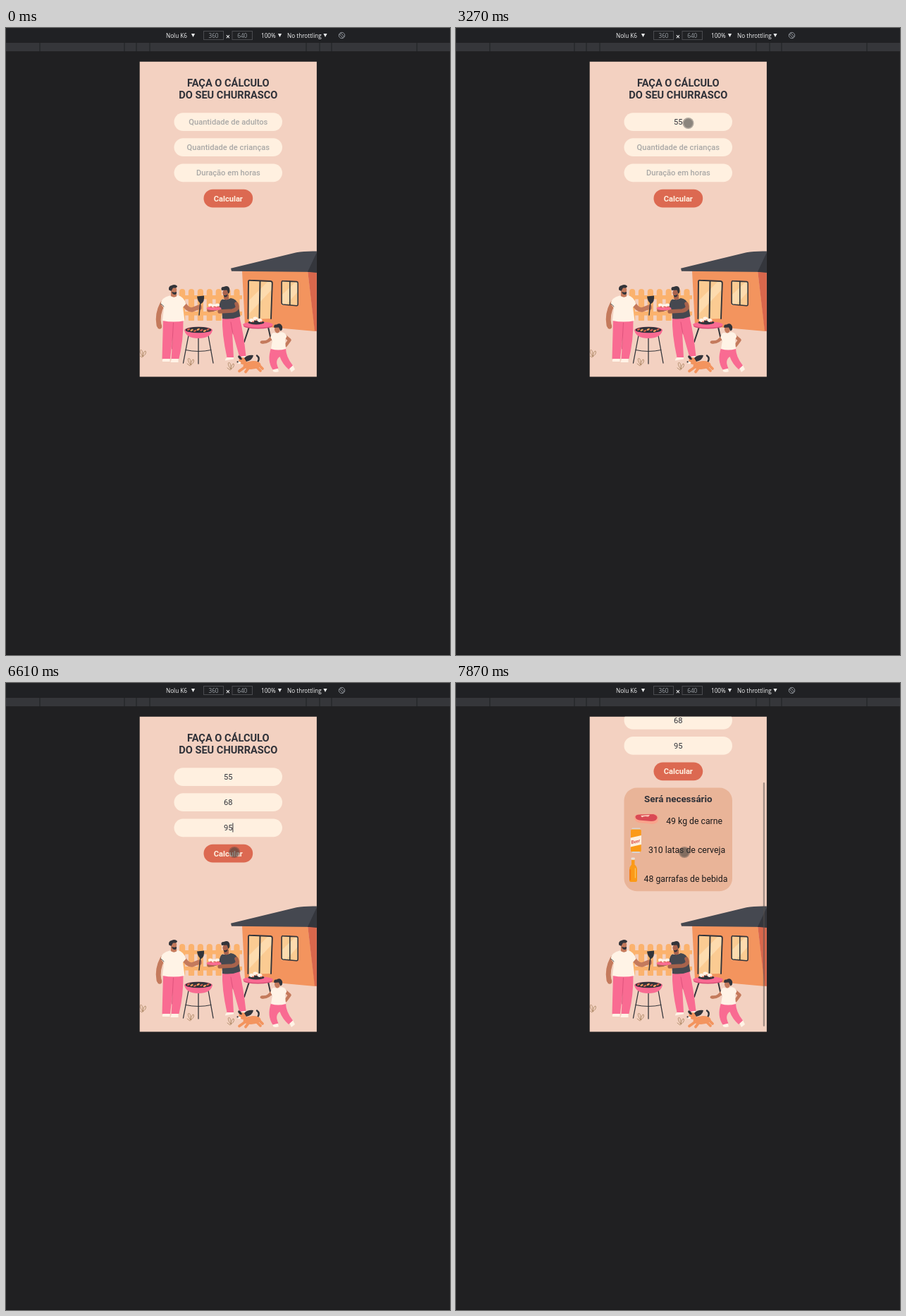
An HTML page with a canvas for the animation above (8 s loop, 630x889 px).

```html
<!DOCTYPE html>
<html lang="pt-BR">
<head>
<meta charset="utf-8">
<title>Cálculo do churrasco</title>
<style>
html, body { margin: 0; width: 100%; height: 100%; overflow: hidden; background: #202124; }
canvas { display: block; width: 630px; height: 889px; }
</style>
</head>
<body>
<canvas id="stage" width="630" height="889"></canvas>
<script>
const ctx = document.getElementById('stage').getContext('2d');
const LOOP = 8000;
const PAGE = { x: 189.7, y: 47.8, w: 251.2, h: 446.7 };
const RESULT_HEIGHT = 116.4;
const RESULT_AT = 6940;
const INK = '#2f3138', CREAM = '#fff0e0', DARK = '#32343a', SLATE = '#454850';
const PINK = '#f96b92', ROSE = '#d94c76', ORANGE = '#f3945e', SKIN = '#c47a5c', TAN = '#a8634c';
const WHITE = '#fff3e6';

// Drawing helpers
function fill(color, path) {
  ctx.fillStyle = color;
  ctx.fill(new Path2D(path));
}
function line(color, width, path) {
  ctx.strokeStyle = color;
  ctx.lineWidth = width;
  ctx.stroke(new Path2D(path));
}
function rect(color, x, y, w, h, r = 0) {
  ctx.fillStyle = color;
  ctx.beginPath();
  ctx.roundRect(x, y, w, h, r);
  ctx.fill();
}
function oval(color, x, y, rx, ry = rx, turn = 0) {
  ctx.fillStyle = color;
  ctx.beginPath();
  ctx.ellipse(x, y, rx, ry, turn, 0, Math.PI * 2);
  ctx.fill();
}
function text(str, x, y, font, color, align = 'left') {
  ctx.font = font;
  ctx.fillStyle = color;
  ctx.textAlign = align;
  ctx.fillText(str, x, y);
}
const roboto = (size, weight = 400) => `${weight} ${size}px Roboto, sans-serif`;
const mix = (a, b, p) => a + (b - a) * p;

function drawToolbar() {
  rect('#202022', 0, 0, 630, 889);
  rect('#202124', 0, 0, 630, 20);
  rect('#35363a', 0, 21, 630, 12);
  for (const x of [48, 168, 185, 204, 426, 445, 462, 583]) rect('#1f2023', x - 0.5, 21, 1, 12);
  rect('#19191b', 0, 888, 630, 1);

  const font = '500 8.2px "Open Sans", sans-serif';
  const boxFont = '8.2px "Open Sans", sans-serif';
  text('Nolu K6', 227, 14, font, '#f4f5f6');
  text('100%', 362, 14, font, '#f4f5f6');
  text('No throttling', 399, 14, font, '#f4f5f6');
  text('×', 315, 16, '600 11px "Open Sans", sans-serif', '#f4f5f6', 'center');
  for (const x of [265.5, 388.5, 453]) fill('#eceef0', `M${x - 2.6} 8h5.2l-2.6 5z`);
  for (const [x, w, label] of [[280, 29, '360'], [320.5, 29.5, '640']]) {
    ctx.strokeStyle = '#4a4b4f';
    ctx.lineWidth = 1;
    ctx.strokeRect(x + 0.5, 4.5, w - 1, 12);
    text(label, x + w / 2, 14, boxFont, '#9aa0a6', 'center');
  }
  line('#9aa0a6', 0.9, 'M480.7 10.5a4.2 4.2 0 1 1-8.4 0a4.2 4.2 0 1 1 8.4 0M473.5 9.2l2-1.7 4 4.3-2 1.8z');
}

function drawHouse() {
  fill(ORANGE, 'M335 344H428L438.5 430L339 421Z');
  fill('#d9674c', 'M428 344H441V430L438 429.6Z');
  fill(SLATE, 'M319 340.7L412 318.3Q424 316 441 316.5V346L320 344.8Z');
  fill('#34363c', 'M441 318L428 345.8L441 347Z');

  fill('#fbcb92', 'M344 358L377.5 360L376 412L343.5 413Z');
  fill('#fddbae', 'M345 386L371 360H377V371L345 405Z');
  line(DARK, 1.9, 'M343.5 412L344 359.5Q344 357.5 346.5 357.7L375.5 359Q378 359.3 377.8 362L376 412');
  line(DARK, 2, 'M360.5 359L359.5 411');
  fill('#fbcb92', 'M391 359H414V393H391Z');
  fill('#fddbae', 'M392 378L411 360H414V374L398 392H392Z');
  line(DARK, 1.6, 'M392.5 358.6L412.5 359.6Q414.3 360 414.2 362V392Q414 394 412 393.8L393 392Q391.2 391.7 391.1 390V361Q391 359 392.5 358.6M402.8 359V393');
}

function drawFence() {
  for (let i = 0; i < 7; i++) rect('#fbb26d', 246 + i * 12.9, 370, 8.2, 45, [4, 4, 1, 1]);
  rect('#fbb26d', 246, 379, 89, 5.5);
  rect('#fbb26d', 246, 402, 89, 5.5);
}

function drawTable() {
  line(DARK, 2, 'M345 424L338 445M372 424L376 442');
  oval(ROSE, 357.5, 422.4, 20.5, 4);
  oval(PINK, 357.5, 420.6, 21.3, 4.4);
  oval(DARK, 355, 417.5, 11.5, 3);
  for (const [x, y] of [[348.5, 414.5], [354, 412], [360, 414.5]]) {
    oval(WHITE, x, y, 3.6, 2.5, 0.2);
    oval('#ee806a', x + 2, y + 1.8, 1.8, 0.9);
  }
}

function drawGrill() {
  line(DARK, 1.3, 'M259 436L251.5 475M273 438V476M287 436L294 475');
  line(DARK, 1, 'M255 456.5Q273 460.5 291 456.5');
  fill(PINK, 'M253 428H293Q291 440 273 440Q255 440 253 428Z');
  oval(PINK, 273, 428.5, 20, 4.8);
  oval(DARK, 273, 428, 18.5, 4.3);
  for (let i = 0; i < 7; i++) {
    oval(i % 2 ? '#f6a05f' : '#c95f4c', 259 + i * 4.6, 427.4 + (i % 3), 2.3, 1.2, -0.5);
  }
}

function drawCook() {
  // Arms and legs
  line(SKIN, 7, 'M222 391Q214 406 217 421');
  oval(SKIN, 218, 423, 3.2, 3.8);
  fill(PINK, 'M223 413H251.5Q252 442 245.5 469H234.5L237 434L233 469H221.5Z');
  line(ROSE, 0.8, 'M237.5 418L235.5 455');
  fill(WHITE, 'M223 469H232.5V473H222Q221 471 223 469M235 469H244.5V474H233.5Z');
  line(SKIN, 6.4, 'M251 389Q257 400 264 399.5L273 396');
  oval(SKIN, 275, 396, 3, 3.8);
  // Shirt and head
  fill(WHITE, 'M232 379.5Q239 383 244 379Q252 381 255.5 391L251 396L253.5 415Q238 418 222 415L224 397L219.5 391Q221 382 232 379.5Z');
  line(DARK, 0.8, 'M219.5 391Q222 392 224 395');
  fill(SKIN, 'M234 374H242V380.5Q238 383 234 380Z');
  oval(SKIN, 238, 371.5, 4.2, 5.5);
  fill(DARK, 'M231.2 371.5Q230 366 235 365Q240 362.5 243 366Q243 369 237 368.5L234.5 373Z');
  fill(DARK, 'M235 374Q239 375.5 242 374Q242.5 378.5 239 378Q236 377.5 235 374Z');
  // Spatula
  line(DARK, 1.5, 'M276 388L274 407');
  fill(DARK, 'M271 380.5L281 379.5Q282 388 277 391Q272 389 271 380.5Z');
}

function drawHost() {
  fill(PINK, 'M307 410L331 408Q337 432 340.5 465L331.5 467L321 430L323 467H313.5Q306 433 307 410Z');
  line(ROSE, 0.8, 'M319 417L322 434');
  fill(WHITE, 'M314 467H323V469.5L311 471.5Q311 468 314 467M332 466L340 465L341 469L331 471Z');
  line(TAN, 5.4, 'M306 392Q300 400 288 400');
  fill(SLATE, 'M307 384.5Q314 386 319 383Q327 384 329.5 392L332.5 409Q320 414 307 412L306.5 400L302.5 395Q303 387 307 384.5Z');
  fill(TAN, 'M309 378H316V384Q312 387 309 383.5Z');
  oval(TAN, 311.5, 375.5, 4, 5.2);
  fill(DARK, 'M306 372Q304 367 309 367Q315 364 317 369Q318.5 374 315.5 377L313.5 371.5Z');
  fill(DARK, 'M308.5 378.5Q311 380 314.5 377.5Q314 382 311 381.5Q309 381 308.5 378.5Z');
  line(TAN, 5.4, 'M327 391Q331 399 321 401L303 402');
  oval(PINK, 295, 397.5, 10.5, 2.8);
  for (let i = 0; i < 3; i++) {
    oval(WHITE, 290 + i * 5, 393 + (i % 2), 3, 2.4);
    oval('#df6357', 291 + i * 5, 395.4, 2, 0.9);
  }
}

function drawChild() {
  line(SKIN, 4.6, 'M378 437Q373 446 364 445.5');
  oval(SKIN, 363, 445.5, 2.4, 2.1);
  fill(WHITE, 'M378 482L385 481L387 487Q382 489 379 487ZM402 482L407 478L410 484L405 488Z');
  fill(PINK, 'M376 454H397Q397 466 407 478.5L401 484Q392 476 388.5 466Q381 471 386.5 482.5L378.5 484.5Q370 472 376 454Z');
  line(SKIN, 4.6, 'M395 436L402.5 442.5L397 450');
  fill(WHITE, 'M380 432Q386 434 390 431Q396 431 398.5 437L396 442L397 455Q386 458 376 455L378 443L375.5 439Q376 433 380 432Z');
  oval(SKIN, 385, 427, 4, 5.4);
  fill(DARK, 'M380.5 425Q379 420 384 420.5Q389.5 417 392 423Q393 428.5 389.5 429.5L387 424.5Z');
}

function drawDog() {
  line(DARK, 2.4, 'M357 474Q361 468 356 464.5');
  line(ORANGE, 3.8, 'M340 480L331 486.5M345 481L340 487.5M359 478L364 483M355 480L361 486');
  oval(ORANGE, 349, 478, 12.5, 5.8, -0.08);
  oval(ORANGE, 336, 472, 5.8, 4.8, 0.25);
  oval(WHITE, 331, 474.6, 2.4, 1.6);
  oval(DARK, 328.6, 473.4, 1.1);
  fill(DARK, 'M334 467Q330 462 329 466Q331 471 335 470ZM338 468Q343 463 351 464Q350 471 341 473Z');
}

function drawGrass() {
  for (const [x, y] of [[194, 462], [262, 474], [319, 480]]) {
    line('#a9835f', 0.8, `M${x} ${y + 4}Q${x - 6} ${y - 4} ${x - 2.5} ${y - 6}Q${x + 0.5} ${y - 4} ${x} ${y + 4}`
      + `Q${x + 1} ${y - 4} ${x + 4} ${y - 4}Q${x + 6} ${y} ${x} ${y + 4}M${x - 1} ${y + 5}l-4 -3`);
  }
}

function drawScene() {
  ctx.lineCap = ctx.lineJoin = 'round';
  drawFence();
  drawHouse();
  drawTable();
  drawGrass();
  drawCook();
  drawHost();
  drawGrill();
  drawChild();
  drawDog();
  ctx.lineCap = 'butt';
  ctx.lineJoin = 'miter';
}

// Form: each field switches from its hint to the typed digits
const FIELDS = [
  { y: 120.2, hint: 'Quantidade de adultos', typed: [[2340, '5'], [2540, '55']] },
  { y: 156.3, hint: 'Quantidade de crianças', typed: [[3620, '6'], [3890, '68']] },
  { y: 192.4, hint: 'Duração em horas', typed: [[5010, '9'], [5410, '95']] },
];
// Caret visibility: start, end, field index
const CARETS = [
  [1280, 1740, 0], [2270, 2810, 0],
  [2810, 3270, 1], [3620, 4290, 1],
  [4290, 4750, 2], [5010, 5880, 2], [6390, 6870, 2],
];

function drawForm(t) {
  text('FAÇA O CÁLCULO', 315.3, 82.8, roboto(14.6, 700), INK, 'center');
  text('DO SEU CHURRASCO', 315.3, 100.4, roboto(14.6, 700), INK, 'center');
  const caret = CARETS.find(([from, to]) => t >= from && t < to);
  FIELDS.forEach(({ y, hint, typed }, i) => {
    rect(CREAM, 238.5, y, 153.5, 25.8, 12.9);
    const value = typed.reduce((now, [at, str]) => (t >= at ? str : now), '');
    if (value) text(value, 315.3, y + 16.8, roboto(11.15), INK, 'center');
    else text(hint, 315.3, y + 16.8, roboto(11.15, 500), '#a9a8a6', 'center');
    if (caret && caret[2] === i) rect(INK, 315 + value.length * 3.2, y + 6, 1, 13.2);
  });
  rect('#dc6951', 280.5, 228.8, 69.7, 25.8, 12.9);
  text('Calcular', 315.3, 245.7, roboto(11.15, 700), CREAM, 'center');
}

function drawResult() {
  rect('#e9b498', 238.5, 265, 153.5, 146.6, 18);
  text('Será necessário', 315.3, 285, roboto(13.38, 700), INK, 'center');
  const font = roboto(12.27), color = '#1c1a1b';
  text('49 kg de carne', 298.2, 316.3, font, color);
  text('310 latas de cerveja', 273, 357.4, font, color);
  text('48 garrafas de bebida', 266.6, 398.4, font, color);

  // Steak
  fill('#f9a48c', 'M253 307Q253 303 259 302.5L281 302Q287 303 287 309Q287 316 279 316.3L260 314.5Q253 313 253 307Z');
  fill('#d94a54', 'M254.5 306Q255 303 261 303L280 302.5Q286 304 285.5 308Q284 312.5 277 312.5L260 311Q254.5 310 254.5 306Z');
  fill('#fbd2c0', 'M262 304.5L275 303.5L273 306Q266 304.5 264 307Z');

  // Can
  rect('#d9d4d0', 249.5, 322, 12, 3.5, 1);
  rect('#fb9a17', 248, 324, 14.7, 32, 2);
  rect('#d9d4d0', 249.5, 355.3, 11.7, 2, 1);
  fill('#fdf0df', 'M247.6 336L263 332.5V345.5L247.6 349Z');
  ctx.save();
  ctx.translate(255.3, 343.3);
  ctx.rotate(-0.22);
  text('Beer', 0, 0, 'italic 700 6.6px Lato, sans-serif', '#d9423c', 'center');
  ctx.restore();

  // Bottle
  fill('#fb9a17', 'M249 366.5H253.5V374Q257 377 257 381V396.5Q257 398.5 255 398.5H248Q246 398.5 246 396.5V381Q246 377 249 374Z');
  rect('#e9e1da', 248.6, 364, 5.2, 3.2, 1);
  rect('#f57f17', 246, 381, 2.2, 15);
  rect('#fdc65c', 253.8, 379, 1.2, 14);
}

// Pointer
const stepped = (t, start, gap, count) =>
  Math.min(count, Math.floor((t - start) / gap) + 1) / count;

function pointerAt(t) {
  if (t < 130) return null;
  if (t < 960) {
    const p = stepped(t, 130, 68, 12), e = 1 - (1 - p) ** 1.7;
    return [mix(626, 346.5, e), mix(915, 145, e)];
  }
  if (t < 6140) {
    const p = stepped(t, 960, 80, 5);
    return [mix(346.5, 329.5, p), mix(145, 135, p)];
  }
  const p = stepped(t, 6140, 67, 8), e = p * p * (3 - 2 * p), q = 1 - e;
  return [q * q * 329.5 + 2 * q * e * 343 + e * e * 324, mix(135, 240, e)];
}

function drawPointer(t) {
  const at = pointerAt(t);
  if (!at) return;
  const [x, y] = at;
  const inside = x < PAGE.x + PAGE.w && y < PAGE.y + PAGE.h;
  if (inside) {
    oval('rgba(70,68,66,.42)', x, y, 8);
    oval('rgba(60,58,56,.32)', x, y, 6.4);
    return;
  }
  const arrow = `M${x} ${y}v11.5l2.6 -2.4 1.8 4 1.8 -.8 -1.8 -3.9h3.6z`;
  fill('#fff', arrow);
  line('#000', 0.7, arrow);
}

function scrollAt(t) {
  if (t < 7670) return 0;
  return t < 7870 ? 69.8 : RESULT_HEIGHT;
}

function draw(t) {
  const hasResult = t >= RESULT_AT, scroll = scrollAt(t);
  drawToolbar();
  ctx.save();
  ctx.beginPath();
  ctx.rect(PAGE.x, PAGE.y, PAGE.w, PAGE.h);
  ctx.clip();
  rect('#f3d1c1', PAGE.x - 1, PAGE.y - 1, PAGE.w + 2, PAGE.h + 2);
  ctx.translate(0, -scroll);
  drawForm(t);
  if (hasResult) {
    drawResult();
    ctx.translate(0, RESULT_HEIGHT);
  }
  drawScene();
  ctx.restore();
  if (scroll) rect('rgba(85,78,76,.5)', 435.8, 49 + scroll * 0.79, 2.3, 346, 1.1);
  drawPointer(t);
}

const started = performance.now();
function tick() {
  draw((performance.now() - started) % LOOP);
  requestAnimationFrame(tick);
}
tick();
</script>
</body>
</html>
```
